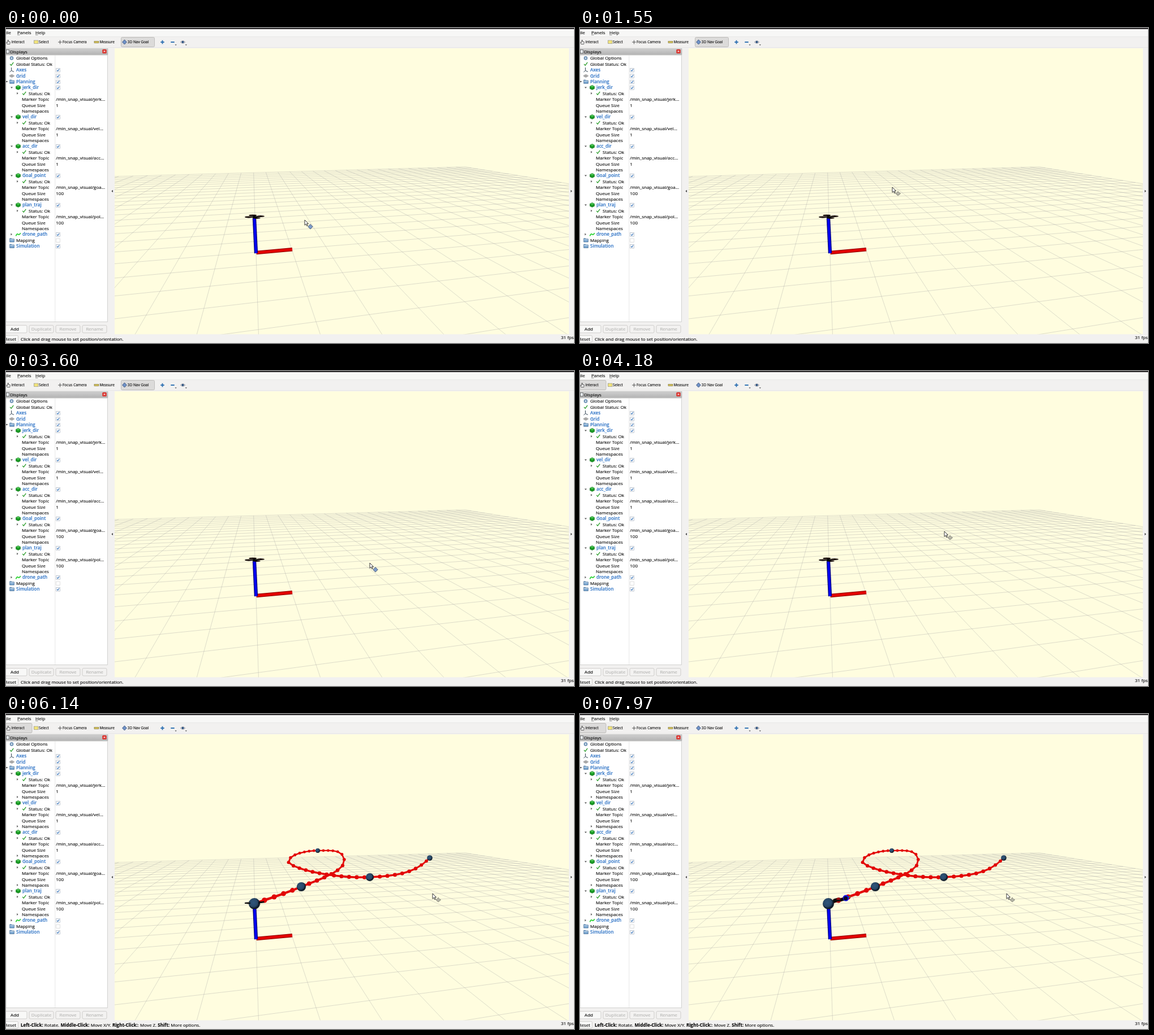
Write an HTML page that moves like this. It is 1004 px wide and 558 px high and loops after 8000 ms.

```html
<!DOCTYPE html>
<html lang="en">
<head>
<meta charset="utf-8">
<title>3D Nav Goal</title>
<style>
html, body { margin: 0; width: 100%; height: 100%; overflow: hidden; background: #f2f1f0; }
svg { display: block; width: 100%; height: 100%; }
text { font: 8px "Open Sans", "Noto Sans", sans-serif; color: #0c0c0c; fill: currentColor; stroke: currentColor; stroke-width: .14; white-space: pre; }
.name { font-weight: 600; color: #2f74c6; }
.tool { font-size: 6.5px; }
.off { color: #b4b4b2; }
.b { font-weight: 700; }
</style>
</head>
<body>
<svg id="stage" viewBox="0 0 1004 558">
  <defs>
    <clipPath id="view"><rect x="192" y="36" width="803" height="506.5"/></clipPath>
    <linearGradient id="head" x2="0" y2="1"><stop stop-color="#cfcfcf"/><stop offset="1" stop-color="#b3b3b3"/></linearGradient>
    <radialGradient id="ball" cx=".42" cy=".4"><stop stop-color="#30567c"/><stop offset=".72" stop-color="#284867"/><stop offset="1" stop-color="#101d2b"/></radialGradient>
  </defs>
  <g id="ui"></g>
  <g id="scene" clip-path="url(#view)"></g>
  <g id="cursor">
    <path d="M0 0V9.3L2.2 7.3L3.8 10.7L5.3 10L3.7 6.7H6.6Z" fill="#fff" stroke="#222" stroke-width=".9"/>
    <path id="goalIcon" d="M10 7.6L14.3 12L10 16.2L5.7 12Z" fill="#7d9ccb" stroke="#3c4a62" stroke-width=".8"/>
    <g id="moveIcon" fill="none" stroke="#868679">
      <path d="M5.6 11H14.6M10 6.8V15.2" stroke-width="1.4"/>
      <ellipse cx="10.2" cy="11.4" rx="3.5" ry="2.4" fill="#b9b9ab" stroke-width=".8"/>
    </g>
  </g>
</svg>
<script>
const $ = id => document.getElementById(id);
const NS = 'http://www.w3.org/2000/svg';

function add(parent, tag, attrs, content) {
  const el = document.createElementNS(NS, tag);
  for (const k in attrs) el.setAttribute(k, attrs[k]);
  if (content !== undefined) el.textContent = content;
  parent.appendChild(el);
  return el;
}
const group = parent => add(parent, 'g', {});
const rect = (p, x, y, width, height, fill, more) => add(p, 'rect', { x, y, width, height, fill, ...more });
const text = (p, x, y, s, cls = '') => add(p, 'text', { x, y, class: cls }, s);
const path = (p, d, stroke, width, fill = 'none') => add(p, 'path', { d, stroke, 'stroke-width': width, fill });
const shape = (p, d, fill) => path(p, d, 'none', 0, fill);
const circle = (p, cx, cy, r, fill) => add(p, 'circle', { cx, cy, r, fill });
const oval = (p, cx, cy, rx, ry, fill) => add(p, 'ellipse', { cx, cy, rx, ry, fill });
const show = (el, on) => el.setAttribute('visibility', on ? 'visible' : 'hidden');

// ---------- window and toolbar ----------
const ui = $('ui');
rect(ui, 0, 0, 1004, 558, '#f2f1f0');
rect(ui, 0, 0, 1004, 2, '#2b292b');
rect(ui, 0, 2, 1004, 13, '#f7f7f6');
path(ui, 'M0 15.5H1004M0 34.5H1004', '#e6e5e4', .8);
const menu = (s, x) => {
  text(ui, x, 10.8, s);
  path(ui, `M${x} 12.2h4.5`, '#333', .6);
};
menu('File', -4);
menu('Panels', 20);
menu('Help', 52);

const pressed = (x, w) => rect(ui, x, 16.5, w, 17, '#dcdbda', { stroke: '#b5b4b2', 'stroke-width': .8, rx: 2 });
const interactOn = pressed(-4, 50);
const goalOn = pressed(203.5, 59);
const tool = (s, x) => text(ui, x, 27.2, s, 'tool');
tool('Interact', 9.5);
tool('Select', 58);
tool('Focus Camera', 100);
tool('Measure', 165.5);
tool('3D Nav Goal', 214.8);
path(ui, 'M2 28.5L1 25L3 25.4V21.5H4.3V24L7.3 24.7L6.7 28.7Z', '#333', .8, '#fff');
rect(ui, 49.5, 22, 7.5, 5.5, '#f2e47c', { stroke: '#777', 'stroke-width': .8, 'stroke-dasharray': '1.4 .7' });
path(ui, 'M92 25H99M95.5 21.5V28.5', '#444', .8);
circle(ui, 95.5, 25, 1.8, '#888');
rect(ui, 156, 23.4, 8, 3, '#d8c55b', { stroke: '#6e642d', 'stroke-width': .6 });
path(ui, 'M209.5 20.8L213.4 25L209.5 29L205.6 25Z', '#344a70', .8, '#6f92c8');
path(ui, 'M273.3 25H279.7M276.5 21.8V28.2M291.3 25H297.7', '#3475b4', 2);
path(ui, 'M308.6 25Q312.5 20.6 316.5 25Q312.5 29 308.6 25Z', '#667', .8, '#e8edf2');
circle(ui, 312.5, 24.8, 1.9, '#244e7d');
shape(ui, 'M298.5 29.3h3.2l-1.6 1.8ZM316.7 29.3h3.2l-1.6 1.8Z', '#444');

// ---------- display tree ----------
rect(ui, 0, 36.5, 180, 11, 'url(#head)', { stroke: '#aaa', 'stroke-width': .5 });
rect(ui, 0, 48, 179.5, 472.5, '#fff', { stroke: '#c9c8c6', 'stroke-width': .8 });
path(ui, 'M86.8 48V520', '#dcdcdc', .7);
rect(ui, .5, 38.7, 5, 6, '#e9eef3', { stroke: '#555', 'stroke-width': .8 });
text(ui, 7, 44.8, 'Displays');
rect(ui, 170.3, 37.7, 7.4, 7.4, '#d9322d', { rx: 1.5 });
path(ui, 'M172.6 40L175.4 42.8M175.4 40L172.6 42.8', '#fff', 1);

const rowY = i => 53.4 + 10.4 * i;
const label = (x, i, s, cls) => text(ui, x, rowY(i) + 2.9, s, cls);
const tick = (x, i) => path(ui, `M${x - 2.8} ${rowY(i)}l2 2.5l4 -5.5`, '#239a23', 1.3);
const openMark = (x, i) => shape(ui, `M${x - 2} ${rowY(i) - 1}h4l-2 2.5Z`, '#555');
const closedMark = (p, x, i) => shape(p, `M${x - 1} ${rowY(i) - 2}v4l2.4 -2Z`, '#555');
const cube = (x, i) => {
  const y = rowY(i);
  path(ui, `M${x} ${y - 4}l4 2v4l-4 2l-4 -2v-4Z`, '#12691a', .6, '#1a9a25');
  shape(ui, `M${x} ${y - 3.6}l3.4 1.7l-3.4 1.7l-3.4 -1.7Z`, '#4cc653');
};
const folder = i => {
  path(ui, `M6.7 ${rowY(i) - 3}h3l1 1h3.7v5.3H6.7Z`, '#3f688f', .7, '#78a5d0');
  path(ui, `M7.2 ${rowY(i) - .7}h6.8`, '#d5e5f3', 1);
};
const check = (i, on = true) => {
  const y = rowY(i);
  rect(ui, 88.7, y - 2.8, 6.6, 6.6, '#fff', { stroke: on ? '#a5b0bd' : '#cfcfcf', 'stroke-width': .7 });
  if (on) path(ui, `M90.2 ${y + .5}l1.4 1.7l2.4 -3.6`, '#2f6fb7', 1.1);
};
const display = (s, i, x = 18) => {
  label(x, i, s, 'name');
  check(i);
};

label(18, 0, 'Global Options');
circle(ui, 10, rowY(0), 3.3, '#6f93b6');
circle(ui, 10, rowY(0), 1.3, '#e4edf5');
label(18, 1, 'Global Status: Ok');
tick(10, 1);
display('Axes', 2);
path(ui, 'M9.5 70V75.5L14 77.5M9.5 75.5L6.5 78', '#345', 1);
display('Grid', 3);
path(ui, 'M6 84.8L10.3 82.3L14.5 84.8L10.3 87.5ZM8 83.5L12.5 86.2M12.5 83.5L8 86.2', '#777', .8, '#ddd');
display('Planning', 4);
openMark(1.4, 4);

const spaceMarks = group(ui);
['jerk_dir', 'vel_dir', 'acc_dir', 'Goal_point', 'plan_traj'].forEach((name, n) => {
  const i = 5 + 5 * n;
  const topic = n === 4 ? 'pol' : name.slice(0, n ? 3 : 4).toLowerCase();
  openMark(10, i);
  cube(21.5, i);
  display(name, i, 29);
  closedMark(ui, 20.2, i + 1);
  tick(32, i + 1);
  label(40, i + 1, 'Status: Ok');
  label(28, i + 2, 'Marker Topic');
  label(88.3, i + 2, `/min_snap_visual/${topic}...`);
  label(28, i + 3, 'Queue Size');
  label(88.3, i + 3, n < 3 ? 1 : 100);
  label(28, i + 4, 'Namespaces');
  closedMark(spaceMarks, 20.2, i + 4);
});
closedMark(ui, 9.5, 30);
path(ui, 'M17.5 368.5Q19 363.5 21.5 365.5T25.5 363', '#28d02e', 1.7);
display('drone_path', 30, 29);
label(18, 31, 'Mapping');
check(31, false);
display('Simulation', 32);
[4, 31, 32].forEach(folder);

// ---------- buttons and status ----------
const button = (x, y, h, s, cls) => {
  rect(ui, x, y, 43, h, cls ? '#f3f2f1' : '#f8f8f7', { rx: 2, stroke: '#c6c4c2', 'stroke-width': .8 });
  text(ui, x + 21.5, y + h / 2 + 2.9, s, cls).setAttribute('text-anchor', 'middle');
};
['Add', 'Duplicate', 'Remove', 'Rename'].forEach((s, i) => button(-6 + 47 * i, 526.7, 13.3, s, i ? 'off' : ''));
button(-21.5, 544.6, 12, '');
text(ui, -2.5, 553.5, 'Reset');
const goalHelp = text(ui, 26, 553.5, 'Click and drag mouse to set position/orientation.');
const viewHelp = text(ui, 26, 553.5, '');
'*Left-Click:* Rotate. *Middle-Click:* Move X/Y. *Right-Click:*: Move Z. *Shift:* More options.'.split('*')
  .forEach((s, i) => add(viewHelp, 'tspan', { class: i % 2 ? 'b' : '' }, s));
text(ui, 981, 551.4, '31 fps');
shape(ui, 'M189 286.8v4.4l-2.6 -2.2ZM998.2 286.8v4.4l2.6 -2.2Z', '#444');

// ---------- ground grid and axes ----------
const scene = $('scene');
rect(scene, 192, 36, 803, 507, '#fffddf');

const rad = Math.PI / 180, pitch = 9.7 * rad, yaw = 14.3 * rad;
const [sp, cp, sy, cy] = [Math.sin(pitch), Math.cos(pitch), Math.sin(yaw), Math.cos(yaw)];
function toCamera(x, y) {
  const right = -2.415 + x * cy - y * sy, ahead = 9.308 + x * sy + y * cy, drop = 3.3375;
  return [right, drop * cp - ahead * sp, ahead * cp + drop * sp];
}
const toScreen = ([x, y, z]) => (593.5 + 611 * x / z).toFixed(2) + ' ' + (289 + 611 * y / z).toFixed(2);
function gridLine(a, b) {
  const near = .4;
  if (a[2] < near && b[2] < near) return '';
  const cut = (p, q) => p[2] >= near ? p : p.map((v, i) => v + (q[i] - v) * (near - p[2]) / (q[2] - p[2]));
  return 'M' + toScreen(cut(a, b)) + 'L' + toScreen(cut(b, a));
}
let lines = '';
const half = 20;
for (let i = -half; i <= half; i++) {
  lines += gridLine(toCamera(i, -half), toCamera(i, half));
  lines += gridLine(toCamera(-half, i), toCamera(half, i));
}
path(scene, lines, '#a0a0a0', .65).setAttribute('opacity', .55);

const rod = (d, dark, bright) => {
  path(scene, d, dark, 6.4);
  path(scene, d, bright, 4);
};
rod('M442.6 398L506 392.3', '#9a0000', '#e60000');
rod('M442 399L439 337', '#000078', '#0000f4');

// ---------- planned path ----------
// pixels per metre for things flying one metre up
const scaleAt = y => (y - 184.6) / 2.3375;
const plan = group(scene);
const route = path(plan, 'M439 336C462 328 496 317 522 306S600 279 598 259S575 242 551 242' +
  'S500 250 499 261S575 292 643 289S728 275 749 255', 'none', 0);
const total = route.getTotalLength();
for (let at = 0, last = route.getPointAtLength(0); at < total;) {
  at = Math.min(total, at + 2 + .26 * scaleAt(last.y));
  const p = route.getPointAtLength(at), k = scaleAt(p.y);
  path(plan, `M${last.x} ${last.y}L${p.x} ${p.y}`, '#e40808', 1 + .058 * k);
  circle(plan, p.x, p.y, .9 + .06 * k, '#df0505');
  last = p;
}

// ---------- drone, goals, arrows ----------
const drone = group(scene);
for (let i = 0; i < 4; i++) {
  const a = i * Math.PI / 2 - .3, x = 439.5 + 11 * Math.cos(a), y = 334.2 + 2.4 * Math.sin(a);
  path(drone, `M439.5 334.5L${x} ${y}`, '#080808', 1.6);
  oval(drone, x, y, 7, 1.5, '#120707');
}
oval(drone, 439.5, 335, 4, 2, '#080808');

const heading = group(scene);
path(heading, 'M-25 7L0 1', '#0b0b0b', 5);
circle(heading, -13, 4, 4.2, '#a00c0c');
path(heading, 'M-21 3Q-10 7 -3 0', '#0b0b0b', 2.4);
path(heading, 'M4 -1L8 -3', '#2f9f2f', 2);
circle(heading, 0, 0, 5.5, '#1414e0');
circle(heading, -.5, .5, 3.5, '#090928');

const goals = group(scene);
const goal = (x, y) => circle(goals, x, y, .15 * scaleAt(y) + .3, 'url(#ball)');
goal(439, 336);
goal(522, 306);
goal(551, 242);
goal(643, 289);
goal(749, 255);
const rotors = path(scene, 'M422 335H432M446 334.8L456 332.4', '#0b0b0b', 2);

function arrow(x, y, from, to) {
  const k = (y - 184.6) / 3.3375, tip = x + 2.34 * k, neck = x + 1.87 * k;
  const el = group(scene);
  rect(el, x, y - .1 * k, 1.9 * k, .2 * k, '#14d41a');
  rect(el, x, y + .05 * k, 1.9 * k, .05 * k, '#10b015');
  oval(el, x, y, .05 * k, .11 * k, '#092c09');
  shape(el, `M${neck} ${y - .17 * k}L${tip} ${y}L${neck} ${y + .17 * k}Z`, '#14d41a');
  oval(el, neck, y, .05 * k, .17 * k, '#0a360b');
  return { el, from, to };
}
const arrows = [arrow(552, 281, 1790, 2330), arrow(643, 336, 3830, 4180), arrow(750, 286, 5100, 5680)];

// ---------- motion ----------
const LOOP = 8000;
const clamp = v => Math.max(0, Math.min(1, v));
const ease = u => u * u * (3 - 2 * u);

// pointer glides: start, end, x, y
const glides = [
  [80, 860, 526, 302], [940, 1480, 552, 282], [1790, 2200, 559, 243], [2430, 2590, 650, 290],
  [2650, 3420, 642, 331], [3480, 3600, 643, 340], [3830, 4010, 644, 284], [4180, 4460, 745, 296],
  [4630, 4860, 752, 289], [5110, 5390, 752, 318], [5680, 6100, 754, 318],
];
function pointer(t) {
  let x = 528, y = 340;
  for (const [from, to, nx, ny] of glides) {
    const e = ease(clamp((t - from) / (to - from)));
    x += (nx - x) * e;
    y += (ny - y) * e;
  }
  return [x, y];
}

const interacting = t => [[200, 1500], [2330, 3300], [4180, 4640], [5680, LOOP]].some(([a, b]) => t >= a && t < b);

function draw(t) {
  const [x, y] = pointer(t);
  $('cursor').setAttribute('transform', `translate(${x} ${y})`);

  // icon and help text lag a little behind the toolbar
  const now = interacting(t), before = interacting(t - 100);
  show($('moveIcon'), now || before);
  show($('goalIcon'), !now && !before);
  show(interactOn, now);
  show(goalOn, !now);
  show(viewHelp, now && before);
  show(goalHelp, !now || !before);
  arrows.forEach(a => show(a.el, t >= a.from && t < a.to));

  const planned = t >= 5900;
  [plan, goals, spaceMarks].forEach(el => show(el, planned));
  const u = clamp((t - 6530) / 1440), s = u * u;
  drone.setAttribute('transform', `translate(${18 * s} ${-5 * s}) rotate(${-13 * s} 439 335)`);
  heading.setAttribute('transform', `translate(${439 + 31 * s} ${336 - 10 * s})`);
  show(heading, u > 0);
  show(rotors, planned && u < .3);
}

function frame(now) {
  draw(now % LOOP);
  requestAnimationFrame(frame);
}
draw(0);
requestAnimationFrame(frame);
</script>
</body>
</html>
```
